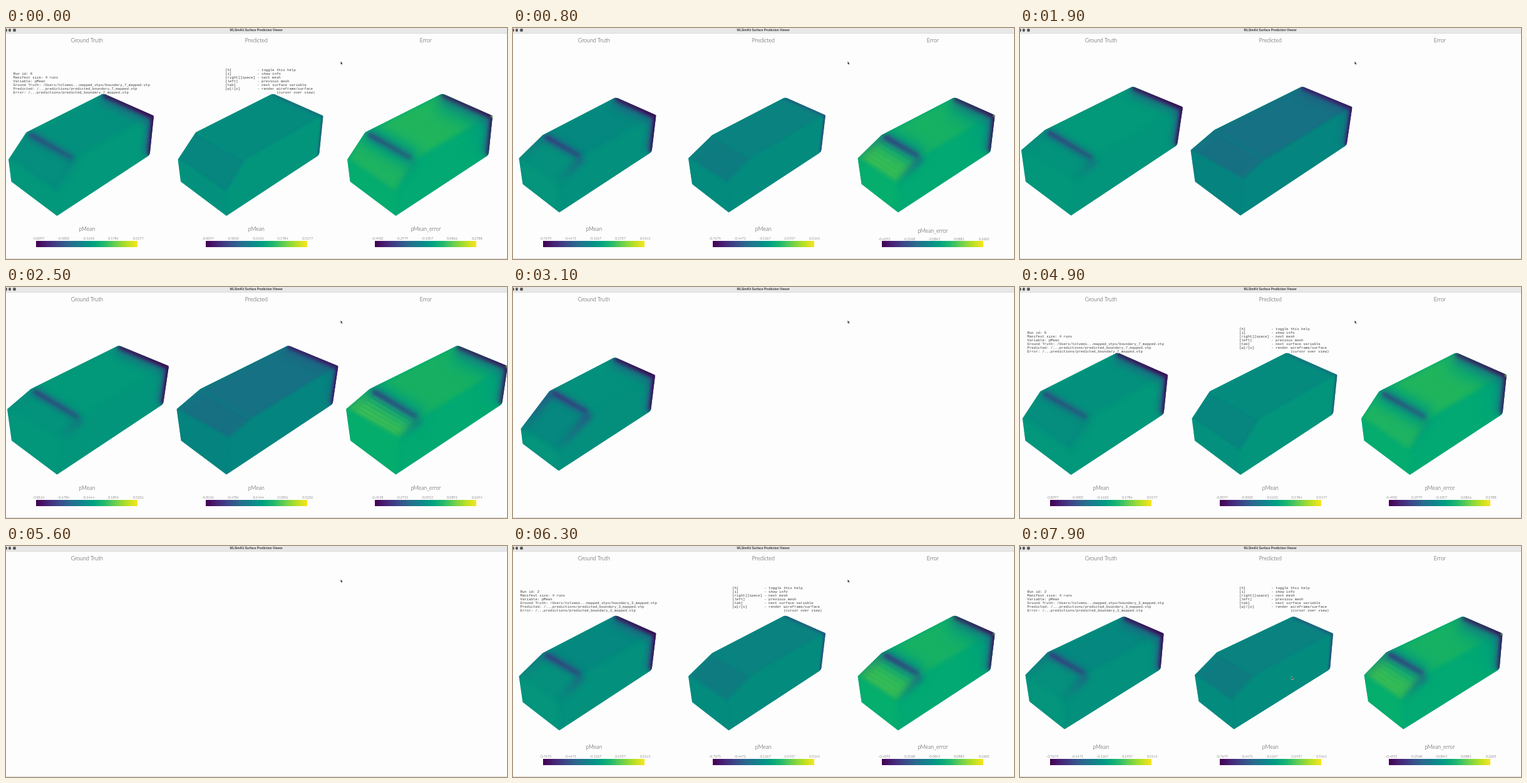
An HTML page with a canvas for the animation above (8 s loop, 800x370 px).

```html
<!DOCTYPE html>
<html lang="en">
<head>
<meta charset="utf-8">
<title>Surface Prediction Viewer</title>
<style>
html, body { margin: 0; width: 100%; height: 100%; overflow: hidden; background: #fefdfe; }
#stage { position: absolute; left: 0; top: 0; width: 800px; height: 370px; overflow: hidden; background: #fefdfe; }
#stage > *, .bar > * { position: absolute; }
canvas { left: 0; top: 0; filter: blur(.5px); }
.chrome { left: 0; top: 0; width: 800px; height: 8px; background: #e9e8e9; border-bottom: 1px solid #dcdbdc; }
.dot { top: 1px; width: 4.6px; height: 4.6px; border-radius: 50%; background: #565656; }
.foot { left: 0; top: 369px; width: 800px; height: 1px; background: #dcdcdc; }
.label { transform: translate(-50%, -50%); white-space: pre; line-height: 1; color: #3c3c3c; font-family: Lato, "Open Sans", sans-serif; }
.window { font: bold 4.9px/1 "Liberation Sans", Arial, sans-serif; color: #3a3a3a; }
.title { font-size: 8.9px; font-weight: 300; }
.name { font-size: 8.7px; font-weight: 300; }
.tick { font-size: 5.4px; font-weight: 300; }
.ramp { left: 48px; top: 341px; width: 162px; height: 9.5px;
  background: linear-gradient(90deg, #430050, #472478, #3c4889, #296a8e, #12838c, #009f82, #1fb86f, #68cf50, #b3df26, #fae51e); }
pre { margin: 0; font: 5.7px/6px "Liberation Mono", "Courier New", monospace; color: #3f3f3f; }
#cursor { left: 0; top: 0; width: 5px; height: 8px; overflow: visible; }
</style>
</head>
<body>
<div id="stage">
  <canvas id="view" width="800" height="370"></canvas>
  <div class="chrome"></div>
  <i class="dot" style="left:-3px"></i><i class="dot" style="left:3.8px"></i><i class="dot" style="left:11.3px"></i>
  <div class="label window" style="left:399.7px;top:3.5px">MLSimKit Surface Prediction Viewer</div>
  <div class="foot"></div>
  <pre id="info" style="left:11.5px;top:71px"></pre>
  <pre id="help" style="left:350px;top:65px">[h]            - toggle this help
[i]            - show info
[right][space] - next mesh
[left]         - previous mesh
[tab]          - next surface variable
[w]/[s]        - render wireframe/surface
                        (cursor over view)</pre>
  <svg id="cursor"><path d="M0 0V5.2L1.2 4.2L2 6L2.9 5.6L2.1 3.9H3.6Z" fill="#111" stroke="#fff" stroke-width=".5"/></svg>
</div>
<script>
const LOOP = 8000, STEP = 100, PITCH = 270.5;
const stage = document.getElementById('stage');
const ctx = document.getElementById('view').getContext('2d');
const info = document.getElementById('info');
const help = document.getElementById('help');
const cursor = document.getElementById('cursor');

// Corners: slant foot, slant top, rear top left, rear top right, rear foot,
// nose foot right, nose foot left, then inner slant top and inner slant foot.
const body = (...n) => Array.from({ length: 9 }, (_, i) => [n[2 * i], n[2 * i + 1]]);
const RADII = [1, 3, 7, 2, 7, 1, 1];
const FACES = [[0, 1, 7, 8], [1, 2, 3, 7], [7, 3, 4, 5, 8], [0, 8, 5, 6]];

// paint: colours of slant, top, side and nose for each of the three views
// glow: dark band strength on the slant top, slant side and slant left edges
const MESHES = {
  A: {
    run: 6, range: [-0.83966, 0.51774], errRange: [-0.49016, 0.2788],
    pts: body(4, 210.5, 32.5, 167, 155.5, 105, 236, 140.5, 229.5, 203.5, 81.5, 301, 8.5, 246, 112, 212, 81, 264),
    paint: ['#058d7e #03917d #02987b #02977b', '#07857f #058a7e #02957c #03917d', '#1db362 #20b55d #02a973 #04ac6e'],
    glow: [.65, .12, 0], ripple: 0, rear: .3
  },
  B: {
    run: 2, range: [-0.7675, 0.5141], errRange: [-0.4292, 0.26054],
    pts: body(9.5, 208.5, 47.5, 171.5, 164, 111, 228.5, 139.5, 221.5, 198.5, 74, 295.5, 15.5, 250, 111, 208, 71, 249),
    paint: ['#05907d #04887f #03907d #04957c', '#0d7d80 #0a8280 #038b7e #038b7e', '#31ba57 #17b164 #02a973 #05ae6c'],
    glow: [.85, .55, .3], ripple: .15, rear: .45
  },
  C: {
    run: 3, range: [-0.8124, 0.5236], errRange: [-0.4518, 0.2694],
    pts: body(2, 195.5, 39.5, 163.5, 180, 93.5, 260, 126.5, 251, 187.5, 81.5, 300.5, 9, 246, 121, 212, 86, 243),
    paint: ['#03937c #02987a #02957b #02967b', '#157282 #157183 #04857f #04837f', '#31b959 #17b062 #02a971 #05ad6c'],
    glow: [.75, .4, .1], ripple: .25, rear: .8
  },
  D: {
    run: 5, range: [-0.7932, 0.5096], errRange: [-0.4406, 0.2658],
    pts: body(12.5, 227, 58.5, 166.5, 162.5, 112.5, 227, 141, 220, 198.5, 73, 294.5, 15.5, 251, 123, 203, 70, 263),
    paint: ['#06877f #03917d #048f7d #04957c', '#0d7c81 #0a8280 #048b7e #048b7e', '#28b85d #17b164 #02a973 #05ad6c'],
    glow: [.95, .8, .7], ripple: .15, rear: .45
  }
};
const TURNED = body(8.5, 206.5, 43.5, 170.5, 166, 112.5, 229.5, 140, 224.5, 197.5, 71, 293.5, 15, 249, 107, 207, 67, 248);

// Each mesh is cleared in at its start and then fills in view by view.
const LOADS = [
  { mesh: 'A', start: -1000 }, { mesh: 'B', start: 100 }, { mesh: 'C', start: 1400 },
  { mesh: 'D', start: 2900 }, { mesh: 'A', start: 3800 }, { mesh: 'B', start: 5500 }
];

const mix = (a, b, k) => a + (b - a) * k;
const mixPt = (p, q, k) => [mix(p[0], q[0], k), mix(p[1], q[1], k)];
const ease = (t, from, to) => {
  const k = Math.min(1, Math.max(0, (t - from) / (to - from)));
  return k * k * (3 - 2 * k);
};

function put(parent, cls, x, y, text = '') {
  const el = document.createElement('div');
  el.className = cls;
  el.style.left = x + 'px';
  el.style.top = y + 'px';
  el.textContent = text;
  return parent.insertBefore(el, parent === stage ? info : null);
}

const titles = ['Ground Truth', 'Predicted', 'Error']
  .map((s, i) => put(stage, 'label title', 129.3 + PITCH * i, 20.2, s));

const bars = [0, 1, 2].map(i => {
  const el = put(stage, 'bar', PITCH * i, 0);
  const ramp = document.createElement('div');
  ramp.className = 'ramp';
  el.append(ramp);
  return {
    el,
    name: put(el, 'label name', 129.3, 322.3, i < 2 ? 'pMean' : 'pMean_error'),
    ticks: [0, 1, 2, 3, 4].map(k => put(el, 'label tick', 52 + 39.8 * k, 337.5))
  };
});

function outline(pts) {
  const n = RADII.length;
  ctx.beginPath();
  ctx.moveTo(...mixPt(pts[n - 1], pts[0], .5));
  for (let i = 0; i < n; i++) ctx.arcTo(...pts[i], ...pts[(i + 1) % n], RADII[i]);
  ctx.closePath();
}

function polygon(pts, colour) {
  ctx.beginPath();
  pts.forEach(p => ctx.lineTo(...p));
  ctx.closePath();
  ctx.fillStyle = colour;
  ctx.fill();
}

// Soft stroke whose opacity runs from a0 at p to a1 at q.
function band(p, q, width, blur, rgb, a0, a1 = a0) {
  const g = ctx.createLinearGradient(...p, ...q);
  g.addColorStop(0, `rgba(${rgb},${a0})`);
  g.addColorStop(1, `rgba(${rgb},${a1})`);
  ctx.filter = `blur(${blur}px)`;
  ctx.strokeStyle = g;
  ctx.lineWidth = width;
  ctx.beginPath();
  ctx.moveTo(...p);
  ctx.lineTo(...q);
  ctx.stroke();
}

function ripples(pts, rgb, alpha) {
  const [s0, s1, , , , , , t, u] = pts;
  for (let i = 1; i < 7; i++) {
    const k = i / 7, p = mixPt(s0, s1, k), q = mixPt(u, t, k);
    band(mixPt(p, q, .15), mixPt(p, q, .9), 2, 1.2, rgb, alpha, alpha * .5);
  }
}

const INK = '66,0,80', BLUE = '50,75,137', VIOLET = '66,40,122', TEAL = '0,158,124';

function rearBands(r0, r1, r2, k) {
  band(r0, r1, 30, 7, BLUE, .5 * k);
  band(r1, r2, 20, 5, BLUE, .6 * k);
  band(r0, r1, 11, 3, INK, .7 * k, k);
  band(r1, r2, 7, 2.5, INK, k, .8 * k);
}

function drawMesh(mesh, pts, view) {
  const colours = mesh.paint[view].split(' ');
  const [s0, s1, r0, r1, r2, , , t, u] = pts;
  const [top, side, left] = mesh.glow;
  ctx.save();
  ctx.translate(PITCH * view, 0);
  outline(pts);
  ctx.fillStyle = colours[2];
  ctx.fill();
  ctx.clip();
  ctx.filter = `blur(${view === 1 ? 2 : 4}px)`;
  FACES.forEach((f, i) => polygon(f.map(j => pts[j]), colours[i]));

  if (view === 1) {
    band(r0, r1, 6, 2, VIOLET, mesh.rear);
    band(r1, r2, 5, 1.5, VIOLET, mesh.rear + .2);
    if (mesh.rear > .6) rearBands(r0, r1, r2, .65);
    if (mesh.ripple) ripples(pts, '50,85,140', mesh.ripple);
  } else {
    if (view === 2) {
      band(r0, r1, 60, 12, TEAL, .8);
      band(r1, r2, 50, 10, TEAL, .7);
      band(s1, t, 36, 9, TEAL, .9);
    }
    rearBands(r0, r1, r2, view ? .85 : 1);
    if (view === 2 && mesh.ripple) ripples(pts, '120,208,82', mesh.ripple * 1.4);
    const a = mixPt(s1, t, .06), b = mixPt(s1, t, .93);
    band(a, b, 15, 5, BLUE, top * .75, top * .5);
    band(a, b, 5, 2.5, VIOLET, top * .9, top * .6);
    band(t, u, 12, 4.5, BLUE, side, 0);
    band(s1, s0, 18, 5, BLUE, left, left * .2);
    if (view === 2) band(mixPt(r1, r2, -.02), mixPt(r1, r2, .05), 5, 1, '120,210,70', .8);
  }
  ctx.restore();
}

function setBars(mesh, late) {
  bars.forEach((bar, i) => {
    const [lo, hi] = i < 2 ? mesh.range : mesh.errRange;
    const drop = late && i === 2 ? 1 : 0;
    bar.ticks.forEach((el, k) => {
      el.textContent = mix(lo, hi, k / 4).toFixed(4);
      el.style.top = 337.5 + drop + 'px';
    });
    bar.name.style.top = 322.3 + 2.5 * drop + 'px';
  });
}

function infoText(run) {
  const file = `boundary_${run + 1}_mapped.vtp`;
  return `Run id: ${run}
Manifest size: 4 runs
Variable: pMean
Ground Truth: /Users/tolvemi...mapped_vtps/${file}
Predicted: /...predictions/predicted_${file}
Error: /...predictions/predicted_${file}`;
}

const show = (el, on) => { el.style.visibility = on ? 'visible' : 'hidden'; };

function render(t) {
  const load = LOADS.filter(l => l.start <= t).pop();
  const mesh = MESHES[load.mesh];
  const level = Math.floor((t - load.start) / STEP);
  const turn = ease(t, 7400, 7900);
  const pts = turn ? mesh.pts.map((p, i) => mixPt(p, TURNED[i], turn)) : mesh.pts;

  ctx.clearRect(0, 0, 800, 370);
  for (let i = 0; i < 3; i++) {
    show(titles[i], level >= 2 * i + 1);
    show(bars[i].el, level >= 7);
    if (level >= 2 * i + 2) drawMesh(mesh, pts, i);
  }
  setBars(mesh, level === 7);

  const texts = level >= 7 && (t < 100 || t >= 4700);
  info.textContent = infoText(mesh.run);
  show(info, texts);
  show(help, texts);

  const move = ease(t, 6800, 7400);
  cursor.style.transform = `translate(${mix(534.3, 433.2, move)}px, ${mix(53.3, 208.5, move)}px)`;
}

const begin = performance.now();
let shown = -1;
function tick() {
  const t = Math.floor(((performance.now() - begin) % LOOP) / STEP) * STEP;
  if (t !== shown) render(shown = t);
  requestAnimationFrame(tick);
}
tick();
</script>
</body>
</html>
```
